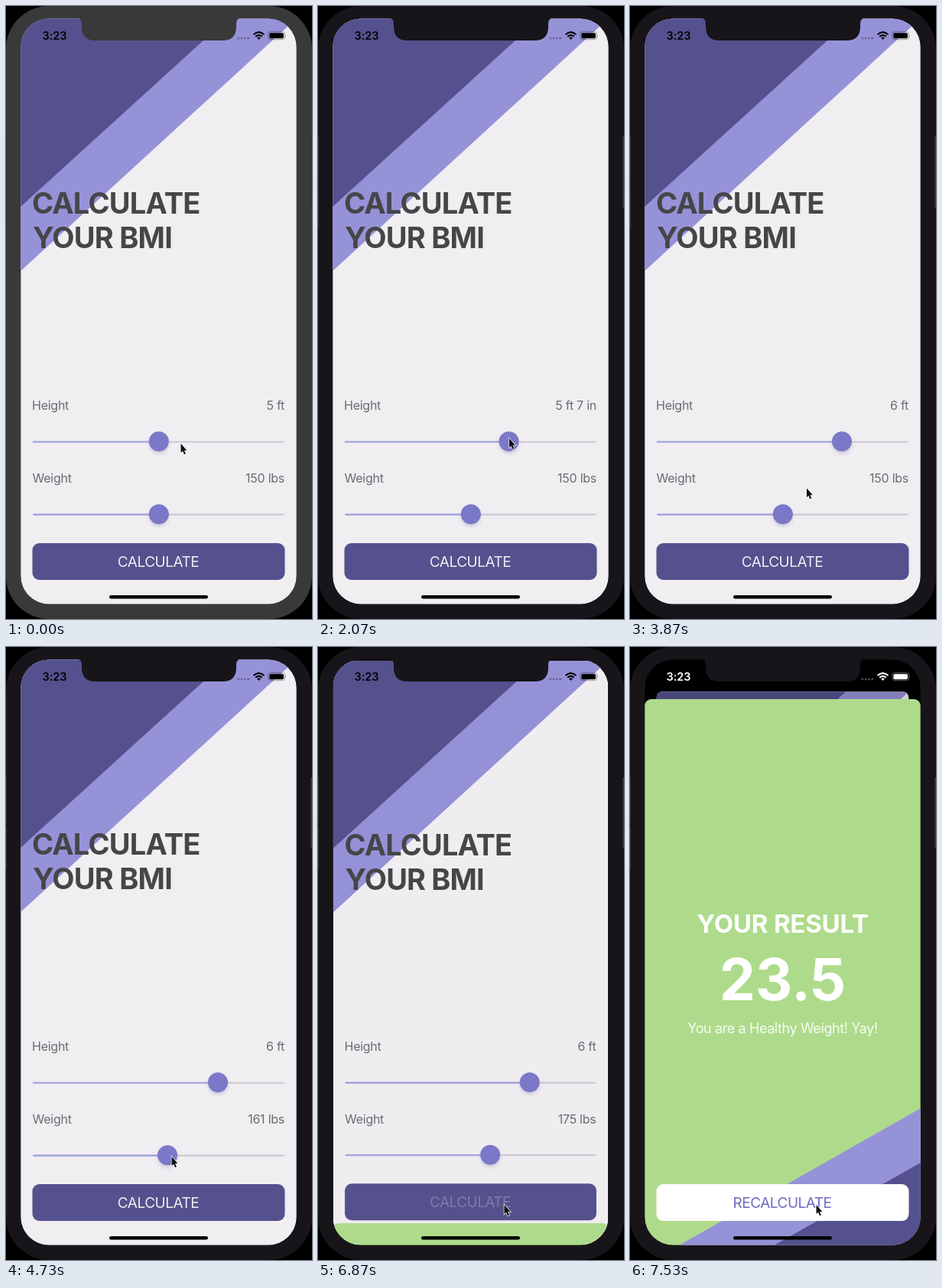
These frames come from a looping animation (400x800 px, 8 s). An HTML page:

```html
<!DOCTYPE html>
<html lang="en">
<head>
<meta charset="utf-8">
<title>BMI calculator</title>
<style>
  html, body { margin: 0; width: 100%; height: 100%; overflow: hidden; background: #000; }
  svg { display: block; width: 100vw; height: 100vh; }
  text { font-family: Inter, "Liberation Sans", sans-serif; }
  .title { font-size: 38px; font-weight: 700; letter-spacing: -.8px; fill: #464548; }
  .label { font-size: 16px; font-weight: 400; letter-spacing: -.25px; fill: #6c6b70; }
  .button { font-size: 19px; font-weight: 400; letter-spacing: -.5px; }
  .result { font-size: 33px; font-weight: 700; letter-spacing: -.2px; }
  .score { font-size: 75px; font-weight: 700; }
  .note { font-size: 18px; font-weight: 400; letter-spacing: -.4px; opacity: .9; }
  .clock { font-size: 14.5px; font-weight: 600; letter-spacing: -.1px; }
  .end { text-anchor: end; }
  .mid { text-anchor: middle; }
</style>
</head>
<body>
<svg viewBox="0 0 400 800" preserveAspectRatio="none">
  <defs>
    <clipPath id="screen"><rect x="19.3" y="16.5" width="360.4" height="764" rx="37"/></clipPath>
    <clipPath id="card"><rect x="19" y="16" width="361" height="765" rx="9"/></clipPath>
    <clipPath id="panel"><rect x="19" y="68" width="361" height="740" rx="9"/></clipPath>
    <filter id="soft" x="-50%" y="-50%" width="200%" height="200%">
      <feGaussianBlur stdDeviation="2.5"/>
    </filter>
    <g id="knob">
      <circle cy="3" r="12.5" fill="#55518f" opacity=".25" filter="url(#soft)"/>
      <circle r="13" fill="#7c78c9"/>
    </g>
  </defs>

  <rect width="400" height="800"/>
  <rect id="bezel" width="400" height="800" rx="56"/>
  <g fill="#343336">
    <rect x="398" y="170" width="2" height="93"/>
    <rect y="170" width="1" height="60"/>
    <rect y="234" width="1" height="56"/>
  </g>

  <g clip-path="url(#screen)">
    <rect width="400" height="800"/>
    <g id="form">
      <g clip-path="url(#card)">
        <rect x="19" y="16" width="361" height="765" fill="#f0eef1"/>
        <path d="M19 16H380L19 346Z" fill="#9692d8"/>
        <path d="M19 16H290L19 262Z" fill="#54518e"/>
        <text class="title" x="34" y="271">CALCULATE</text>
        <text class="title" x="35" y="316">YOUR BMI</text>

        <text class="label" x="34" y="527">Height</text>
        <text class="label end" x="364" y="527" id="height"></text>
        <rect x="35" y="567.7" width="329" height="2.4" rx="1.2" fill="#cfcdd3"/>
        <rect x="35" y="567.7" height="2.4" rx="1.2" fill="#a5a8df" id="heightFill"/>
        <use href="#knob" id="heightKnob"/>

        <text class="label" x="34.5" y="622">Weight</text>
        <text class="label end" x="364" y="622" id="weight"></text>
        <rect x="35" y="662.5" width="329" height="2.4" rx="1.2" fill="#cfcdd3"/>
        <rect x="35" y="662.5" height="2.4" rx="1.2" fill="#a5a8df" id="weightFill"/>
        <use href="#knob" id="weightKnob"/>

        <rect x="34.5" y="701" width="330" height="48" rx="9" fill="#54518e"/>
        <text class="button mid" x="199" y="732" fill="#f0eef1" id="submit">CALCULATE</text>
        <rect x="19" y="16" width="361" height="765" id="dim"/>
      </g>
    </g>

    <g id="sheet">
      <g clip-path="url(#panel)">
        <rect x="19" y="68" width="361" height="740" fill="#aedb8b"/>
        <path d="M380 602V808H16Z" fill="#9692d8"/>
        <path d="M380 673V808H140Z" fill="#54518e"/>
        <g fill="#fff">
          <text class="result mid" x="199.5" y="373">YOUR RESULT</text>
          <text class="score mid" x="199.5" y="461">23.5</text>
          <text class="note mid" x="199.5" y="503.5">You are a Healthy Weight! Yay!</text>
          <rect x="34.5" y="701" width="330" height="48" rx="9"/>
        </g>
        <text class="button mid" x="199" y="732" fill="#706bc2">RECALCULATE</text>
      </g>
    </g>
    <rect x="135" y="769" width="129" height="4.6" rx="2.3"/>
  </g>

  <path id="notch" d="M92 15Q99 16 99 23V27Q99 45 117 45H283Q301 45 301 27V23Q301 16 308 15Z"/>

  <g id="status">
    <text class="clock" x="47.6" y="43.7">3:23</text>
    <path d="M302.5 42H319" stroke="currentColor" stroke-width="2.6" stroke-dasharray="2.6 1.7" opacity=".3"/>
    <g fill="none" stroke="currentColor" stroke-width="2.1">
      <path d="M323.6 37.3Q330.5 30.8 337.4 37.3"/>
      <path d="M326.2 40Q330.5 36 334.8 40"/>
    </g>
    <path d="M328.2 41.6Q330.5 39.6 332.8 41.6L330.5 44Z"/>
    <rect x="342.9" y="33.7" width="21.6" height="10" rx="3" fill="none" stroke="currentColor" opacity=".35"/>
    <rect x="344.4" y="35.2" width="18.6" height="7" rx="1.7"/>
    <path d="M365.6 37V40.4Q367 38.7 365.6 37Z" opacity=".4"/>
  </g>

  <path id="cursor" d="M.5 1V13L3 10.7L5 15.2L6.9 14.3L5 10H8.4Z"
        fill="#111" stroke="#fff" stroke-width="1.6" stroke-opacity=".85" paint-order="stroke"/>
</svg>

<script>
const LOOP = 8000, FPS = 15, MID = 199.8;
const HEIGHT_DRAG = [600, 3130], WEIGHT_DRAG = [4270, 5400];
const FOCUS = 600, PRESS = 6730, PRESENT = 6850;

// pointer path: time, x, y
const path = [
  [0, 228, 570], [60, 228, 570], [330, MID, 564], [600, MID, 564],
  [1200, 226.5, 564], [3000, 274.3, 562.5], [3130, 277, 562.5],
  [3270, 277, 562.5], [3330, 278, 562], [3470, 278, 562],
  [4130, 204.8, 664], [4270, 204.8, 664], [4730, 216, 664],
  [5400, 230.2, 664], [5940, 230.2, 664], [6400, 243, 727], [LOOP, 243, 727]
];

const $ = id => document.getElementById(id);
const clamp = (v, lo, hi) => Math.min(hi, Math.max(lo, v));
const set = (id, name, value) => $(id).setAttribute(name, value);

function pointer(t) {
  const i = Math.max(1, path.findIndex(p => p[0] >= t));
  const [a, b] = [path[i - 1], path[i]];
  const u = clamp((t - a[0]) / (b[0] - a[0]), 0, 1);
  // free moves ease, drags run evenly
  const k = a[2] === b[2] || b[0] === 3000 ? u : u * u * (3 - 2 * u);
  return [a[1] + (b[1] - a[1]) * k, a[2] + (b[2] - a[2]) * k];
}

// critically damped spring
function spring(ms) {
  const wt = 19.1 * Math.max(0, ms) / 1000;
  return 1 - (1 + wt) * Math.exp(-wt);
}

function slider(id, x, y, label) {
  set(id + 'Knob', 'transform', `translate(${x} ${y})`);
  set(id + 'Fill', 'width', x - 35);
  $(id).textContent = label;
}

function feet(x) {
  const inches = Math.floor(60 + (x - MID) / 6.31 + 1e-6);
  const rest = inches % 12;
  return Math.floor(inches / 12) + ' ft' + (rest ? ` ${rest} in` : '');
}

function pounds(x) {
  return Math.floor(150 + (x - MID) / 1.01 + 1e-6) + ' lbs';
}

function draw(t) {
  const [cx, cy] = pointer(t);
  set('cursor', 'transform', `translate(${cx} ${cy})`);

  const hx = pointer(clamp(t, ...HEIGHT_DRAG))[0];
  const wx = pointer(clamp(t, ...WEIGHT_DRAG))[0] - 5;
  slider('height', hx, 568.3, feet(hx));
  slider('weight', wx, 663.3, pounds(wx));

  const shell = t < FOCUS ? '#39393a' : '#171519';
  set('bezel', 'fill', shell);
  set('notch', 'fill', shell);
  set('submit', 'opacity', t < PRESS ? 1 : .27);

  const p = spring(t - PRESENT);
  set('form', 'transform',
    `translate(199.5 ${398.5 + 9.3 * p}) scale(${1 - .086 * p}) translate(-199.5 -398.5)`);
  set('dim', 'opacity', .13 * p);
  set('sheet', 'transform', `translate(0 ${713 * (1 - p)})`);

  const v = Math.round(255 * clamp((t - 6870) / 300, 0, 1));
  const ink = `rgb(${v},${v},${v})`;
  set('status', 'fill', ink);
  set('status', 'color', ink);
}

const start = performance.now();
function tick() {
  const t = (performance.now() - start) % LOOP;
  draw(Math.floor((t + 3.4) * FPS / 1000) * 1000 / FPS);
  requestAnimationFrame(tick);
}
draw(0);
requestAnimationFrame(tick);
</script>
</body>
</html>
```
